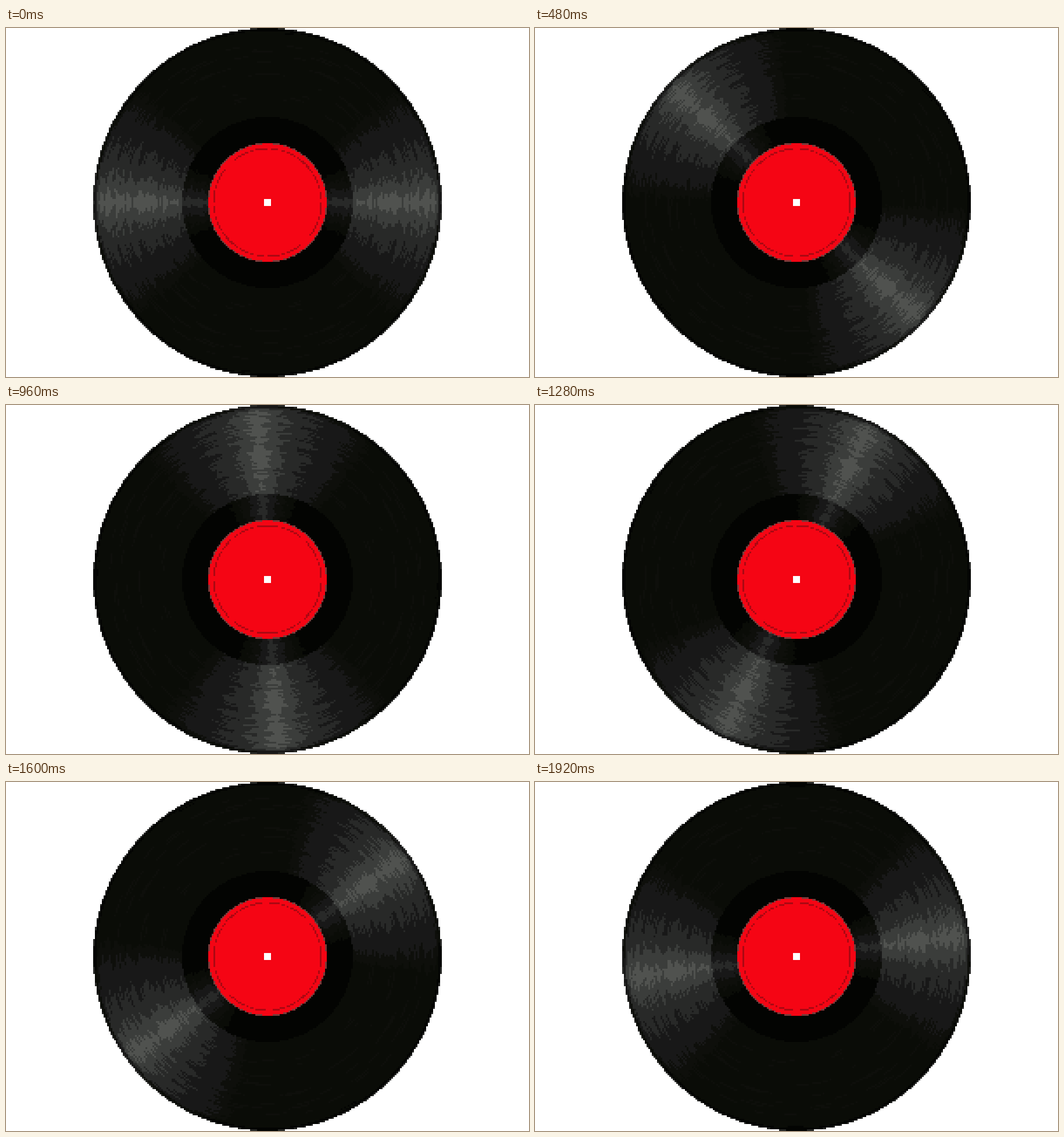
An HTML page with a canvas for the animation above (2 s loop, 900x600 px).

```html
<!DOCTYPE html>
<html lang="en">
<head>
<meta charset="utf-8">
<title>Spinning record</title>
<style>
  html, body { margin: 0; width: 100%; height: 100%; overflow: hidden; background: #fff; }
  canvas { display: block; width: 900px; height: 600px; image-rendering: pixelated; }
</style>
</head>
<body>
<canvas id="stage" width="300" height="200"></canvas>
<script>
const W = 300, H = 200, STEPS = 25, STEP_MS = 80;
const ctx = document.getElementById('stage').getContext('2d');
const image = ctx.createImageData(W, H);

const WHITE = [255, 255, 255], RED = [245, 5, 20], RING = [172, 8, 18];
const LABEL_EDGE = [124, 58, 58], RIM = [40, 41, 39];
const VINYL = [[3, 4, 2], [10, 12, 7], [14, 15, 11], [24, 24, 24],
               [40, 41, 40], [59, 61, 59], [80, 82, 79]];

// Sheen brightness by degrees away from the highlight axis
const SHEEN = [[0, 80], [4, 67], [9, 52], [17, 36], [30, 24], [42, 12], [180, 11]];

function sheen(deg) {
  let i = 1;
  while (SHEEN[i][0] < deg) i++;
  const [a, va] = SHEEN[i - 1], [b, vb] = SHEEN[i];
  return va + (vb - va) * (deg - a) / (b - a);
}

function hash(n) {
  const s = Math.sin(n * 127.1 + 11.7) * 43758.5453;
  return s - Math.floor(s);
}

function nearest(v) {
  return VINYL.reduce((best, c) => Math.abs(c[1] - v) < Math.abs(best[1] - v) ? c : best);
}

function vinyl(r, theta) {
  const off = Math.abs(Math.atan(Math.tan(theta))) * 180 / Math.PI;
  const groove = Math.floor(r * 1.3);
  const h = hash(groove);
  const waves = 2 * Math.floor(3 + 6 * hash(groove + 200));
  const grain = 1 + 0.26 * (h - 0.5 + 0.25 * Math.sin(theta * waves + h * 40));
  if (r < 49) return nearest(sheen(off * 1.6) * grain * 0.5);
  const fade = r > 98.3 ? 0.35 : r > 97 ? 0.8 : 1;
  return nearest(sheen(off) * grain * fade);
}

function colour(x, y, turn) {
  const dx = x + 0.5 - W / 2, dy = y + 0.5 - H / 2;
  const r = Math.hypot(dx, dy);
  if (r > 100 || Math.max(Math.abs(dx), Math.abs(dy)) < 2) return WHITE;
  const theta = Math.atan2(dy, dx) - turn;
  if (r < 33.6) {
    const reach = 0.34 + 0.1 * Math.sin(theta * 14);
    return Math.abs(r - 30.85) < reach ? RING : RED;
  }
  if (r < 34.25) return LABEL_EDGE;
  if (r > 99.7) return RIM;
  return vinyl(r, theta);
}

function draw(step) {
  const turn = step / STEPS * Math.PI;
  for (let y = 0, p = 0; y < H; y++) {
    for (let x = 0; x < W; x++, p += 4) {
      image.data.set(colour(x, y, turn), p);
      image.data[p + 3] = 255;
    }
  }
  ctx.putImageData(image, 0, 0);
}

let shown = -1;
function tick() {
  const step = Math.floor(performance.now() / STEP_MS) % STEPS;
  if (step !== shown) draw(shown = step);
  requestAnimationFrame(tick);
}
tick();
</script>
</body>
</html>
```
